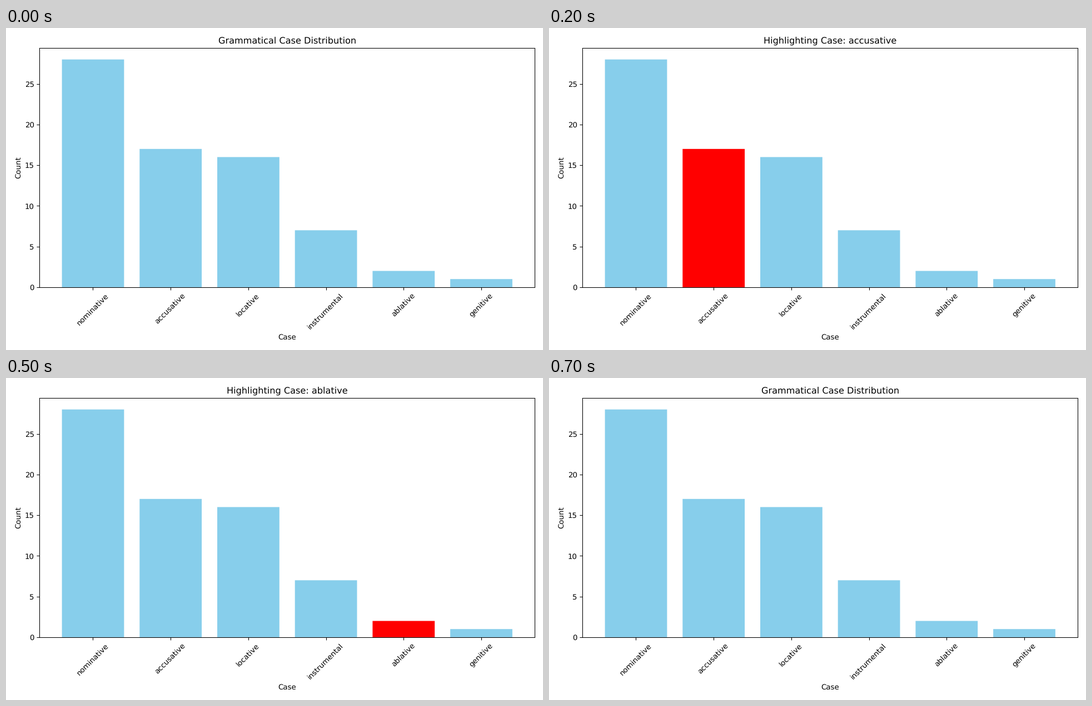
A matplotlib script for the animation above (0.8 s loop, 966 px wide and 580 px high).

```python
import matplotlib.pyplot as plt
from matplotlib.animation import FuncAnimation

WIDTH, HEIGHT, DPI = 966, 580, 100
SCALE = WIDTH / 1000  # text and lines are sized for a 1000 pixel wide chart
LEFT, RIGHT, TOP, BOTTOM = 60.1, 951.4, 36.15, 466.9  # plot area, pixels from top left

COUNTS = {
    "nominative": 28,
    "accusative": 17,
    "locative": 16,
    "instrumental": 7,
    "ablative": 2,
    "genitive": 1,
}
CASES = list(COUNTS)

plt.rcParams.update({"font.family": "DejaVu Sans", "text.hinting": "none"})
for name in ("font.size", "axes.titlepad", "axes.labelpad", "axes.linewidth",
             "xtick.major.size", "xtick.major.pad", "xtick.major.width",
             "ytick.major.size", "ytick.major.pad", "ytick.major.width"):
    plt.rcParams[name] *= SCALE

fig = plt.figure(figsize=(WIDTH / DPI, HEIGHT / DPI), dpi=DPI, facecolor="white")
ax = fig.add_axes([
    LEFT / WIDTH,
    1 - BOTTOM / HEIGHT,
    (RIGHT - LEFT) / WIDTH,
    (BOTTOM - TOP) / HEIGHT,
])
bars = ax.bar(CASES, list(COUNTS.values()), color="skyblue", snap=False)
ax.set_xlabel("Case")
ax.set_ylabel("Count")
ax.tick_params(axis="x", rotation=45)
title = ax.set_title("Grammatical Case Distribution")


def update(frame):
    """Highlight one bar per step, with a plain chart first and last."""
    active = frame - 1
    for i, bar in enumerate(bars):
        bar.set_facecolor("red" if i == active else "skyblue")
    if 0 <= active < len(CASES):
        title.set_text(f"Highlighting Case: {CASES[active]}")
    else:
        title.set_text("Grammatical Case Distribution")
    return [*bars, title]


anim = FuncAnimation(fig, update, frames=len(CASES) + 2, interval=100,
                     repeat=True, repeat_delay=0, blit=False)
plt.show()
```
